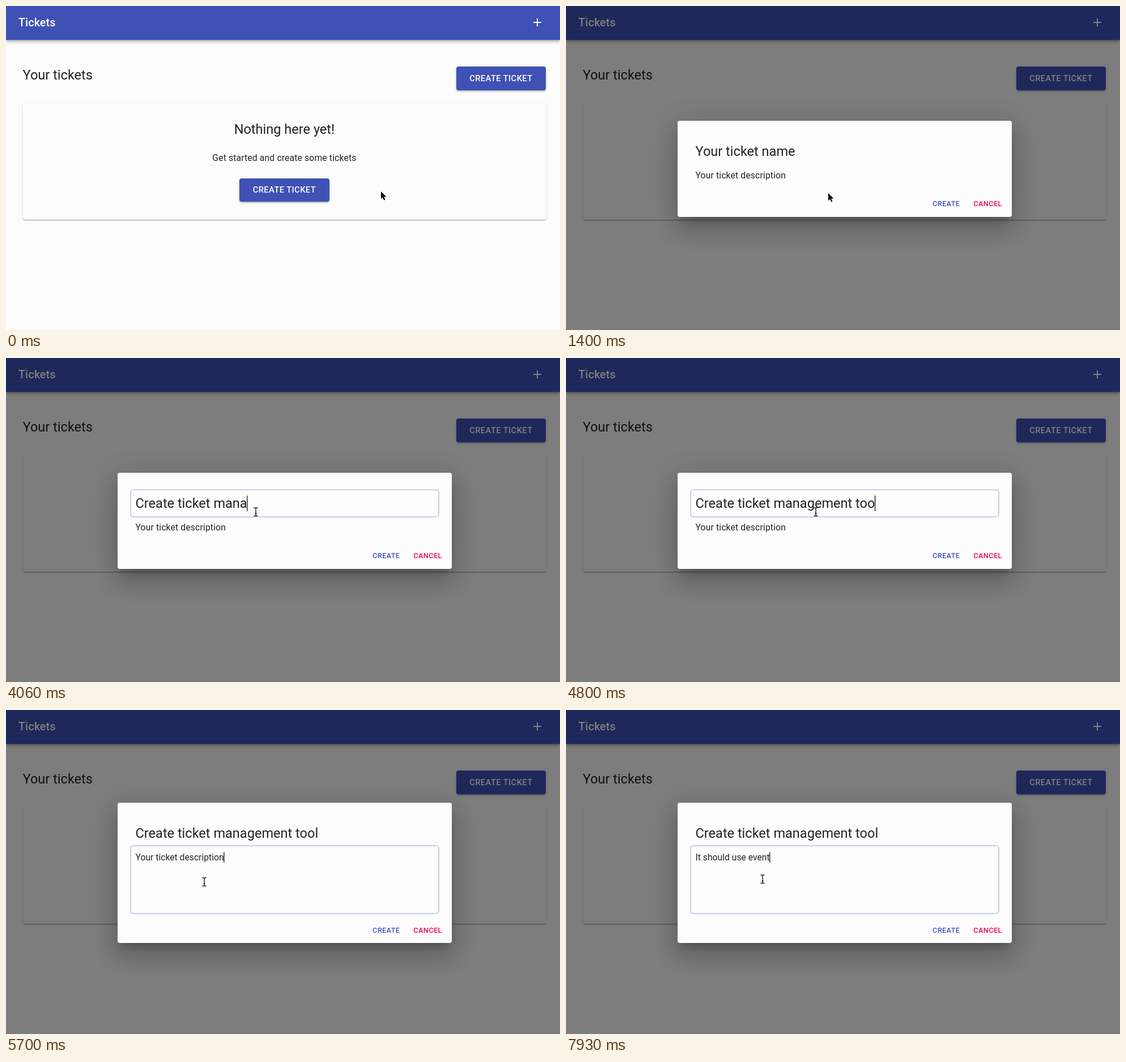
Write an HTML page that moves like this. It is 978 px wide and 573 px high and loops after 8000 ms.

```html
<!DOCTYPE html>
<html lang="en">
<head>
<meta charset="utf-8">
<title>Tickets</title>
<style>
  html, body { margin: 0; width: 100%; height: 100%; overflow: hidden; background: #fcfcfc; }
  body { position: relative; font-family: Roboto, sans-serif; }
  body > *, .button i { position: absolute; }
  .layer { left: 0; top: 0; width: 978px; height: 573px; }
  text { fill: rgba(0, 0, 0, .87); white-space: pre; }
  .middle { text-anchor: middle; }
  .heading { font-size: 23.56px; }
  .body { font-size: 15.71px; letter-spacing: .147px; }
  .label { font-size: 14.73px; font-weight: 500; letter-spacing: .42px; fill: #fff; }
  .action { font-size: 12.77px; font-weight: 500; letter-spacing: .365px; }

  #bar { left: 0; top: 0; width: 978px; height: 60px; background: #3f51b5;
    box-shadow: 0 2px 4px -1px #0003, 0 4px 5px #00000024, 0 1px 10px #0000001f; }
  #card { left: 29.5px; top: 171.5px; width: 924px; height: 206px; border-radius: 4px; background: #fcfcfc;
    box-shadow: 0 1px 3px #0003, 0 1px 1px #00000024, 0 2px 1px -1px #0000001f; }
  .button { width: 158.5px; height: 41.5px; border-radius: 4px; background: #3f51b5; overflow: hidden;
    box-shadow: 0 1px 5px #0003, 0 2px 2px #00000024, 0 3px 1px -2px #0000001f; }
  .button.hover { background: #3949a3; }
  .button i { left: 18.5px; top: -6px; width: 66px; height: 66px; border-radius: 50%; background: #ffffff2c; }

  #backdrop { background: #000; }
  #dialog { left: 197px; width: 589.5px; border-radius: 4px; background: #fdfdfd;
    box-shadow: 0 11px 15px -7px #0003, 0 24px 38px 3px #00000024, 0 9px 46px 8px #0000001f; }
  .box { fill: none; stroke-width: 4; paint-order: stroke; }
  .box.hover { fill: #f0f0ef; }
  .box.focus { fill: #fdfdfd; stroke: #c8cee9; }
  .selection { fill: #b3d7ff; }
</style>
</head>
<body>
<div id="bar"></div>
<div id="card"></div>
<div class="button" style="left:794.5px;top:107px"></div>
<div class="button" id="start" style="left:412px;top:304.5px"><i id="ripple"></i></div>
<svg class="layer">
  <text x="22" y="35.5" style="font-size:19.64px;font-weight:500;letter-spacing:.147px;fill:#fff">Tickets</text>
  <path d="M931 29H945M938 22V36" stroke="#fff" stroke-width="2"/>
  <text class="heading" x="29.5" y="130">Your tickets</text>
  <text class="label middle" x="873.9" y="133">CREATE TICKET</text>
  <text class="heading middle" x="491.4" y="226">Nothing here yet!</text>
  <text class="body middle" x="491.4" y="274.3">Get started and create some tickets</text>
  <text class="label middle" x="491.4" y="330.3">CREATE TICKET</text>
</svg>
<div class="layer" id="backdrop"></div>
<svg id="dialog">
  <g id="fields"></g>
  <g id="actions">
    <text class="action" x="450" style="fill:#3f51b5">CREATE</text>
    <text class="action" x="522.3" style="fill:#f50057">CANCEL</text>
  </g>
</svg>
<svg class="layer">
  <g id="arrow">
    <path d="M0 0V13.2L3 10.4L5.2 15.6L7.4 14.7L5.2 9.6H9.4Z" stroke="#fff" stroke-width="2" paint-order="stroke"/>
  </g>
  <g id="beam" fill="none">
    <path id="beamShape" d="M-3.5-7.5Q0-7.5 0-5.5Q0-7.5 3.5-7.5M0-6V6M-3.5 7.5Q0 7.5 0 5.5Q0 7.5 3.5 7.5M-1.5 3H1.5" stroke="#111" stroke-width="1.3"/>
  </g>
</svg>
<script>
const LOOP = 8000, TICK = 147.5, DIALOG_X = 197;
const $ = id => document.getElementById(id);
const between = (t, from, to) => t >= from && t < to;
const ticks = (t, start) => Math.floor((t - start) / TICK);
const smooth = p => p * p * (3 - 2 * p);

const moves = [
  { start: 500, steps: 5, to: [463, 331] },
  { start: 1690, steps: 3, to: [441, 272] },
  { start: 5250, steps: 3, to: [337, 309] },
  { start: 5700, steps: 2, to: [363, 299] },
  { start: 6747, steps: 4, to: [347, 299] },
];

function pointerAt(t) {
  let pos = [662, 328];
  for (const { start, steps, to } of moves) {
    if (t < start) break;
    const p = smooth(Math.min(1, (ticks(t, start) + 1) / steps));
    pos = pos.map((v, i) => v + (to[i] - v) * p);
  }
  return pos;
}

// Typing replaces the placeholder, two characters per tick.
const typed = (t, start, first, placeholder, value) =>
  t < start ? placeholder : value.slice(0, Math.max(1, first + 2 * ticks(t, start)));

function makeField(style, size, top, baseline) {
  const group = document.createElementNS("http://www.w3.org/2000/svg", "g");
  group.innerHTML = `<rect class="box" x="24" y="${top}" width="542" rx="4"/>
    <rect class="selection" x="31.5" y="${baseline - .927 * size}" height="${1.172 * size}"/>
    <text class="${style}" x="31.5" y="${baseline}"></text>
    <rect class="caret" y="${baseline - .927 * size}" width="1.2" height="${1.172 * size}"/>`;
  $("fields").append(group);
  const [box, selection, label, caret] = group.children;

  return ({ height, text, focus, selected, pointer, dialogTop, spacing = 0 }) => {
    const y = pointer[1] - dialogTop;
    const over = between(pointer[0] - DIALOG_X, 24, 566) && between(y, top, top + height);
    box.setAttribute("height", height);
    box.setAttribute("class", "box" + (focus ? " focus" : over ? " hover" : ""));
    label.style.letterSpacing = (focus ? 0 : spacing) + "px";
    if (label.textContent !== text) label.textContent = text;
    const width = label.getComputedTextLength();
    selection.setAttribute("width", selected ? width : 0);
    caret.setAttribute("x", 31.5 + width - .4);
    caret.style.display = focus && !selected ? "" : "none";
    return over;
  };
}

const drawName = makeField("heading", 23.56, 31, 62.2);
const drawDescription = makeField("body", 15.71, 77, 102);

function draw(t) {
  const pointer = pointerAt(t);
  const open = t < 1240 ? 0 : t < 1390 ? .07 : 1;
  const expanded = t >= 5690;
  const dialogTop = expanded ? 163.5 : 203;
  const dialogHeight = expanded ? 248 : 169.5;

  $("start").classList.toggle("hover", t >= 940);
  $("ripple").style.display = between(t, 1240, 1390) ? "" : "none";
  $("backdrop").style.opacity = open / 2;
  $("dialog").style.opacity = open;
  $("dialog").style.top = dialogTop + "px";
  $("dialog").style.height = dialogHeight + "px";
  $("actions").setAttribute("transform", `translate(0 ${dialogHeight - 18.5})`);

  const overName = drawName({
    height: 46, pointer, dialogTop,
    text: typed(t, 2730, 0, "Your ticket name", "Create ticket management tool"),
    focus: between(t, 2125, 5245),
    selected: between(t, 2425, 2730),
  });
  const overDescription = drawDescription({
    height: expanded ? 118 : 39, pointer, dialogTop, spacing: .147,
    text: typed(t, 6600, 1, "Your ticket description", "It should use event"),
    focus: expanded,
    selected: between(t, 5990, 6600),
  });

  const editing = open === 1 && (overName || overDescription);
  for (const [id, shown] of [["arrow", !editing], ["beam", editing]]) {
    $(id).style.display = shown ? "" : "none";
    $(id).setAttribute("transform", `translate(${pointer})`);
  }
}

const begin = performance.now();
function frame() {
  draw((performance.now() - begin) % LOOP);
  requestAnimationFrame(frame);
}
frame();
</script>
</body>
</html>
```
